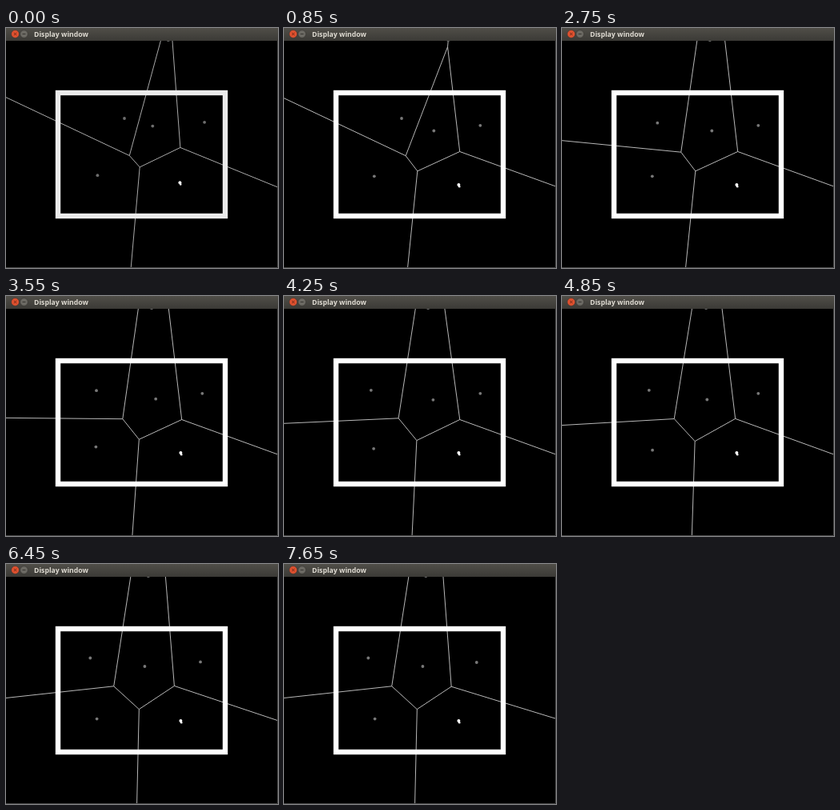
Write an HTML page that moves like this. It is 340x300 px and loops after 8 s.

```html
<!DOCTYPE html>
<html lang="en">
<head>
<meta charset="utf-8">
<title>Display window</title>
<style>
  html, body { margin: 0; width: 100%; height: 100%; overflow: hidden; background: #000; }
  svg { display: block; width: 100vw; height: 100vh; }
  text { font: 700 8.7px "Open Sans", "Noto Sans", sans-serif; fill: #dfdbd2; }
</style>
</head>
<body>
<svg viewBox="0 0 340 300">
  <defs>
    <linearGradient id="bar" x2="0" y2="1">
      <stop offset="0" stop-color="#504e48"/>
      <stop offset="1" stop-color="#3b3a36"/>
    </linearGradient>
    <clipPath id="view"><rect y="16" width="340" height="284"/></clipPath>
  </defs>
  <rect width="340" height="300"/>
  <g id="scene">
    <g clip-path="url(#view)" fill="none">
      <path id="edges" stroke="#ccc" stroke-width=".9"/>
      <path id="stub" stroke="#666"/>
    </g>
    <rect x="65" y="81" width="209" height="154" fill="none" stroke="#fff" stroke-width="6.4"/>
    <g id="dots"></g>
  </g>
  <path d="M339.5 16v283.5H0" fill="none" stroke="#444"/>

  <rect width="340" height="16" fill="url(#bar)"/>
  <circle cx="11.5" cy="7.5" r="4.9" fill="#e0512f" stroke="#35332f" stroke-width=".6"/>
  <path d="M9.9 5.9l3.2 3.2m0-3.2l-3.2 3.2" stroke="#6b2817"/>
  <circle cx="22.5" cy="7.5" r="4.8" fill="#6c6a64" stroke="#35332f" stroke-width=".6"/>
  <path d="M20.5 7.5h4" stroke="#3a3834" stroke-width="1.1"/>
  <text x="35" y="10.5">Display window</text>
</svg>
<script>
  const LOOP = 8000, STEP = 50, TOP = 16;
  const $ = id => document.getElementById(id);
  const move = (from, to, x, y) => ({ from, to, x, y });

  // Sites start at (x, y) and are dragged by one move after another.
  const left = { x: 148, y: 113, moves: [
    move(0, 850, 147, 113), move(1500, 2750, 119.3, 118.7),
    move(3100, 4050, 108.8, 117.8), move(5950, 6450, 105.3, 117.5)] };
  const middle = { x: 183.3, y: 122.6, moves: [
    move(0, 850, 187.3, 128.5), move(3500, 4050, 186.4, 129.8),
    move(4400, 5650, 175.7, 129.2), move(5700, 5800, 173.4, 128)] };
  const right = { x: 248.1, y: 117.8, moves: [
    move(0, 850, 245.3, 121.8), move(5950, 7250, 240.8, 123)] };
  const low = { x: 114.4, y: 184.2, moves: [
    move(0, 850, 112.8, 185.3), move(3100, 4050, 112.1, 190.8),
    move(4400, 5250, 113.6, 193.6)] };
  const cursor = { x: 217.4, y: 193.2, moves: [move(0, 850, 218.4, 196)] };
  const tracks = [left, middle, right, low, cursor];

  const ease = u => u * (1.5 - u / 2);

  function siteAt({ x, y, moves }, t) {
    for (const m of moves) {
      const u = ease(Math.min(1, Math.max(0, (t - m.from) / (m.to - m.from))));
      x += (m.x - x) * u;
      y += (m.y - y) * u;
    }
    return { x, y };
  }

  const bisector = (a, b) => ({
    x: (a.x + b.x) / 2, y: (a.y + b.y) / 2, dx: a.y - b.y, dy: b.x - a.x
  });

  // The part of the bisector of a and b that no other site is closer to.
  function voronoiEdge(a, b, sites) {
    const m = bisector(a, b);
    let lo = -20, hi = 20;
    for (const c of sites) {
      if (c === a || c === b) continue;
      const cx = c.x - a.x, cy = c.y - a.y;
      const slope = cx * m.dx + cy * m.dy;
      const limit = cx * ((a.x + c.x) / 2 - m.x) + cy * ((a.y + c.y) / 2 - m.y);
      if (slope > 0) hi = Math.min(hi, limit / slope);
      else lo = Math.max(lo, limit / slope);
    }
    if (lo >= hi) return "";
    const point = s => `${(m.x + m.dx * s).toFixed(2)} ${(m.y + m.dy * s).toFixed(2)}`;
    return `M${point(lo)}L${point(hi)}`;
  }

  function addDot(r, fill) {
    const dot = document.createElementNS("http://www.w3.org/2000/svg", "circle");
    dot.setAttribute("r", r);
    dot.setAttribute("fill", fill);
    return $("dots").appendChild(dot);
  }
  const dots = tracks.map(s => s === cursor ? addDot(2, "#fff") : addDot(1.9, "#787878"));
  const tail = addDot(1.3, "#fff");

  function place(dot, x, y) {
    dot.setAttribute("cx", x);
    dot.setAttribute("cy", y);
  }

  function draw(t) {
    const sites = tracks.map(s => siteAt(s, t));
    const [a, , c, , pointer] = sites;
    let d = "";
    sites.forEach((p, i) => sites.slice(i + 1).forEach(q => d += voronoiEdge(p, q, sites)));
    $("edges").setAttribute("d", d);

    // Where the bisector of the two outer sites meets the top of the view.
    const m = bisector(a, c);
    const x = m.x + m.dx * (TOP - m.y) / m.dy;
    $("stub").setAttribute("d", `M${x - 1.5} ${TOP + .5}h3`);

    sites.forEach((s, i) => place(dots[i], s.x, s.y));
    place(tail, pointer.x + .8, pointer.y + 2.2);
    $("scene").setAttribute("opacity", t < STEP ? .92 : 1);
  }

  const start = performance.now();
  function tick() {
    const t = (performance.now() - start) % LOOP;
    draw(Math.floor(t / STEP) * STEP);
    requestAnimationFrame(tick);
  }
  tick();
</script>
</body>
</html>
```
